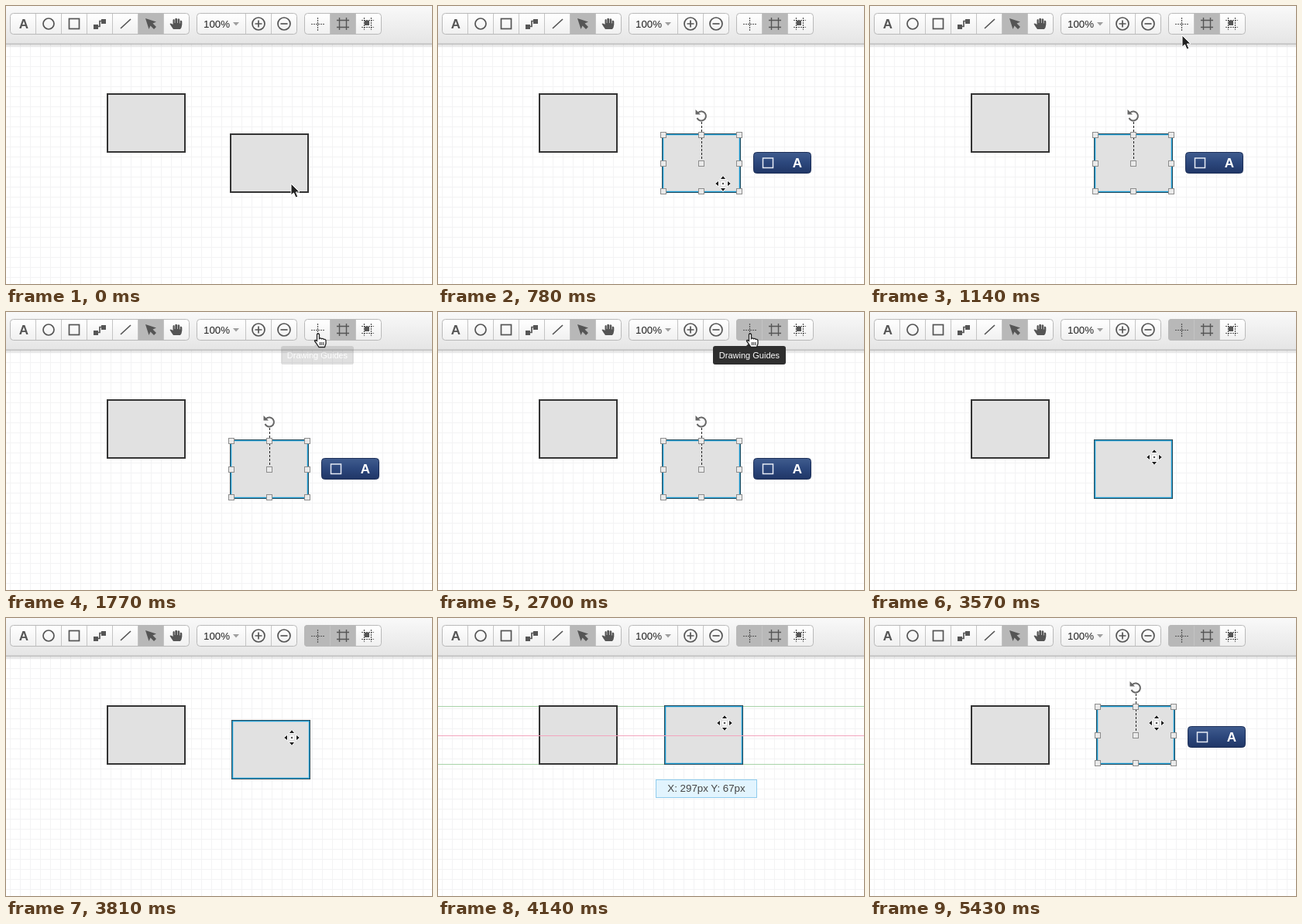
Recreate the animation shown at these times as an HTML page. Size 550 by 360 pixels, loop 5460 ms.

```html
<!DOCTYPE html>
<html lang="en">
<head>
<meta charset="utf-8">
<title>Drawing guides</title>
<style>
  html, body { margin: 0; width: 100%; height: 100%; overflow: hidden; background: #fff; }
  svg { display: block; width: 100vw; height: 100vh; font-family: "Liberation Sans", Arial, sans-serif; }
  .group { fill: url(#button); stroke: #b9b9b9; }
  .divider { stroke: #c4c4c4; }
  .pressed { fill: #b8b8b8; }
  .icon { fill: none; stroke: #555; stroke-width: 1.7; }
  .solid { fill: #555; }
  .shape { fill: #e1e1e1; stroke: #333; stroke-width: 2; }
  .handle { fill: #eaeaea; stroke: #8c8c8c; }
  .cursor { stroke: #fff; stroke-width: 1; fill: #222; }
  .bold { font-weight: bold; font-size: 17px; text-anchor: middle; }
</style>
</head>
<body>
<svg viewBox="0 0 550 360" xmlns="http://www.w3.org/2000/svg">
  <defs>
    <linearGradient id="bar" x2="0" y2="1"><stop stop-color="#f9f9f9"/><stop offset="1" stop-color="#e5e5e5"/></linearGradient>
    <linearGradient id="button" x2="0" y2="1"><stop stop-color="#fff"/><stop offset="1" stop-color="#f0f0f0"/></linearGradient>
    <linearGradient id="shade" x2="0" y2="1"><stop stop-color="#000" stop-opacity=".16"/><stop offset="1" stop-color="#000" stop-opacity="0"/></linearGradient>
    <linearGradient id="navy" x2="0" y2="1"><stop stop-color="#405c8e"/><stop offset=".5" stop-color="#2c477c"/><stop offset="1" stop-color="#203666"/></linearGradient>
    <pattern id="grid" x="5" y="0" width="13" height="13" patternUnits="userSpaceOnUse">
      <path d="M.5 0V13M0 .5H13" stroke="#f3f3f4"/>
    </pattern>
  </defs>

  <rect width="550" height="360" fill="#fff"/>
  <rect width="550" height="360" fill="url(#grid)"/>

  <!-- toolbar -->
  <rect y="49" width="550" height="5" fill="url(#shade)"/>
  <rect width="550" height="49" fill="url(#bar)"/>
  <path d="M0 49H550" stroke="#b4b4b4"/>
  <rect class="group" x="5.5" y="9.5" width="231" height="27" rx="4"/>
  <rect class="group" x="246.5" y="9.5" width="129" height="27" rx="4"/>
  <rect class="group" x="385.5" y="9.5" width="99" height="27" rx="4"/>
  <rect class="pressed" x="170" y="9" width="34" height="28"/>
  <rect class="pressed" x="418" y="9" width="34" height="28"/>
  <path id="guidesOn" class="pressed" d="M418 9H389Q385 9 385 13V33Q385 37 389 37H418Z"/>
  <path class="divider" d="M38.5 10V36M71.5 10V36M104.5 10V36M137.5 10V36M170.5 10V36M203.5 10V36M309.5 10V36M342.5 10V36M418.5 10V36M451.5 10V36"/>

  <text class="bold solid" x="23" y="29">A</text>
  <g class="icon">
    <circle cx="55" cy="23" r="7"/>
    <rect x="81.5" y="16.5" width="13" height="13"/>
    <path d="M118 26.5H121V19.5H124M148 29L161 17"/>
    <circle cx="326" cy="23" r="8"/><path d="M321.5 23H330.5M326 18.500V27.500"/>
    <circle cx="359" cy="23" r="8"/><path d="M354.500 23H363.500"/>
    <path d="M394 23.500H411M402.500 15V32" stroke-width="1.200" stroke-dasharray="2 1"/>
    <path d="M430.500 15V31M439.500 15V31M427 18.500H443M427 27.500H443" stroke-width="1.400"/>
    <path d="M462.500 15V31M471.500 15V31M459 18.500H475M459 27.500H475" stroke-width="1.200" stroke-dasharray="2 1"/>
  </g>
  <g class="solid">
    <path d="M113 24h6v6h-6zM123 17h6v6h-6zM463 19h6v6h-6z"/>
    <path d="M180 16L194 20.500L189.500 22.500L194 27L191 30L186.500 25.500L184.500 30Z"/>
    <path d="M216 30Q213 26 211.500 23Q213 21.500 215.500 24V18Q216.500 16 217.700 18V22H218.300V16.500Q219.700 14.800 221 16.500V22H221.600V17Q223 15.500 224.200 17.200V22.500H224.800V19Q226.500 18 227.300 20V24Q227 28 225 30Z"/>
    <path d="M293 21H301L297 25.500Z" opacity=".55"/>
  </g>
  <text x="255" y="27.500" font-size="13.300" fill="#222">100%</text>

  <!-- document -->
  <path id="edgeGuides" d="M0 114.500H550M0 189.500H550" stroke="#a8d3a8"/>
  <rect class="shape" x="131" y="114" width="100" height="75"/>
  <g id="block">
    <rect class="shape" width="100" height="75"/>
    <rect id="outline" x=".5" y=".5" width="99" height="74" fill="none" stroke="#1a9bd3" stroke-width="1.500"/>
    <g id="handles">
      <path d="M50.500 -16V34" stroke="#222" stroke-dasharray="3 2"/>
      <g id="handleBoxes" class="handle"></g>
      <g transform="translate(50 -24)">
        <path d="M-5.500 3A6 6 0 1 0 -4 -4" fill="none" stroke="#666" stroke-width="2"/>
        <path d="M-7.500 -8V-1.500H-1Z" fill="#666"/>
      </g>
    </g>
  </g>
  <path id="centerGuide" d="M0 152.500H550" stroke="#f3a5be"/>
  <path id="passingGuide" d="M0 152.500H550M0 189.500H550" stroke="#f3a5be"/>

  <g id="menu">
    <rect x=".5" y=".5" width="74" height="27" rx="4" fill="url(#navy)" stroke="#1e3058"/>
    <rect x="12.500" y="8" width="13" height="12.500" fill="none" stroke="#e6ebf5" stroke-width="1.500"/>
    <text class="bold" x="57" y="20" fill="#fff">A</text>
  </g>
  <g id="label">
    <rect x="281.500" y="209.500" width="130" height="23" fill="#e2f4fe" stroke="#8ecbed"/>
    <text x="346.500" y="225" font-size="13.300" fill="#444" text-anchor="middle">X: 297px Y: 67px</text>
  </g>
  <g id="tooltip">
    <rect x="355" y="44" width="94" height="24" rx="3" fill="#2f2f2f"/>
    <path d="M398 44L402 40L406 44Z" fill="#2f2f2f"/>
    <text x="402" y="60" font-size="11" fill="#fff" text-anchor="middle">Drawing Guides</text>
  </g>

  <g id="cursor">
    <path id="arrow" class="cursor" d="M0 0V15L3.500 12L6 18L8.800 17L6.300 11H11Z"/>
    <g id="move" class="cursor" stroke-width=".8">
      <path d="M0 -10.500L4 -5.500H-4ZM0 10.500L4 5.500H-4ZM-10.500 0L-5.500 4V-4ZM10.500 0L5.500 4V-4Z"/>
      <circle r="3" fill="#eee"/><circle r="1" stroke="none"/>
    </g>
    <g id="hand">
      <path d="M-1.500 1Q0 -1 1.500 1V6.500Q3 5 4.500 6.800Q6 5.700 7.300 7.500Q9.500 6.800 10 9V13L8.500 17.500H1L-2 13L-4.500 9.500Q-4 7.500 -1.500 9.500Z" fill="#fff" stroke="#222" stroke-width="1.300"/>
      <path d="M2.500 11V15M4.700 11V15M6.900 11V15" stroke="#222"/>
    </g>
  </g>
</svg>
<script>
const LOOP = 5460, STEP = 30;
const START = { x: 290, y: 166 }, SHIFT = { x: 3, y: -52 };
const GRAB = { x: 77, y: 22 };
const el = id => document.getElementById(id);
const progress = (t, from, to) => Math.min(1, Math.max(0, (t - from) / (to - from)));
const mix = (a, b, p) => a + (b - a) * p;
const easeOut = (p, power) => 1 - (1 - p) ** power;
const easeInOut = p => p < .5 ? 2 * p * p : 1 - 2 * (1 - p) ** 2;
const show = (id, alpha) => el(id).setAttribute('opacity', +alpha);
const place = (id, x, y) => el(id).setAttribute('transform', `translate(${x} ${y})`);

for (const x of [1, 50, 99]) for (const y of [1, 38, 74])
  el('handleBoxes').innerHTML += `<rect x="${x - 3.5}" y="${y - 3.5}" width="7" height="7"/>`;

function pointer(t, block) {
  if (t < 780) return { x: 368, y: 229.5 };
  if (t < 2700) {
    const p = progress(t, 780, 1350);
    return { x: mix(368, 403, easeOut(p, 5)), y: mix(229.5, 28, easeOut(p, 3)) };
  }
  if (t < 3570) {
    const p = easeInOut(progress(t, 2670, 3510));
    return { x: mix(403, 367, p), y: mix(28, 188, p) };
  }
  return { x: block.x + GRAB.x, y: block.y + GRAB.y };
}

function draw(t) {
  const drag = easeOut(progress(t, 3570, 4140), 1.8);
  const snapped = drag > .98;
  const travel = snapped ? 1 : drag;
  const block = {
    x: Math.round(START.x + SHIFT.x * travel),
    y: Math.round(START.y + SHIFT.y * travel)
  };
  const released = t >= 4530;
  const selected = (t >= 510 && t < 3540) || released;
  const aligned = snapped && !released;

  place('block', block.x, block.y);
  show('outline', t >= 480);
  show('handles', selected);
  place('menu', block.x + 117, released ? 140 : 189);
  show('menu', selected ? progress(t, released ? 4500 : 480, released ? 4620 : 600) : 0);

  show('edgeGuides', aligned);
  show('centerGuide', aligned);
  show('label', aligned);
  show('passingGuide', Math.abs(START.y - 14 - block.y) < 3);

  show('guidesOn', t >= 2190);
  show('tooltip', t < 2700 ? progress(t, 1745, 1920) : 1 - progress(t, 2730, 2910));

  const { x, y } = pointer(t, block);
  const overBlock = t >= 480 && x > block.x && x < block.x + 100 && y > block.y && y < block.y + 75;
  const overButton = y < 37;
  place('cursor', Math.round(x), Math.round(y));
  show('move', overBlock);
  show('hand', overButton);
  show('arrow', !overBlock && !overButton);
}

function tick() {
  const t = performance.now() % LOOP;
  draw(Math.floor(t / STEP) * STEP);
  requestAnimationFrame(tick);
}
tick();
</script>
</body>
</html>
```
